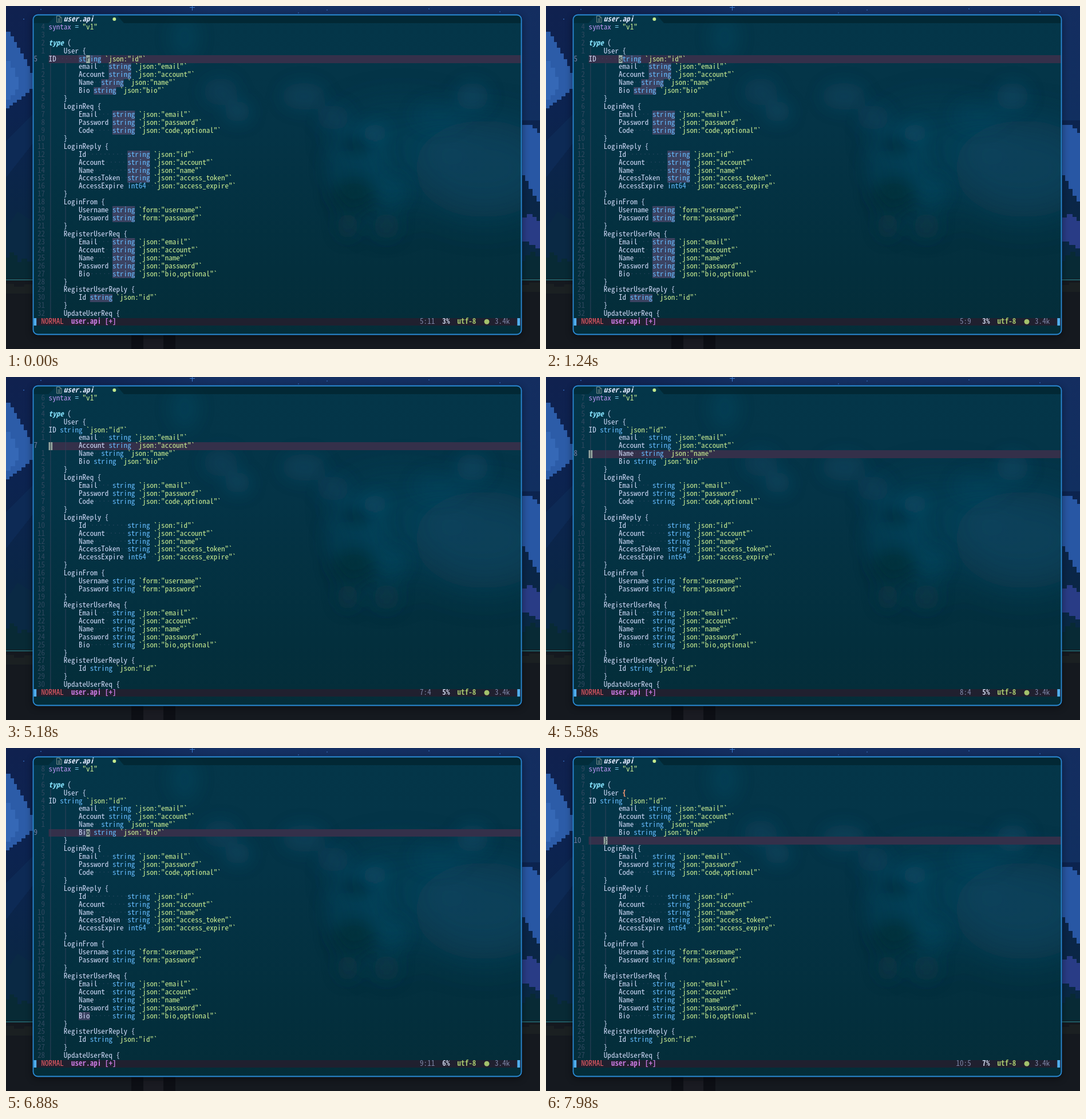
Recreate the animation shown at these times as an HTML page. Size 933 px wide and 600 px high, loop 8000 ms.

```html
<!DOCTYPE html>
<html lang="en">
<head>
<meta charset="utf-8">
<title>Editor session</title>
<style>
  html, body { margin: 0; width: 100%; height: 100%; overflow: hidden; background: #0a1838; }
  svg { display: block; width: 933px; height: 600px; }
  text { white-space: pre; fill: #d0daf8; }
  #editor { font-family: "Noto Sans Mono CJK JP", "Noto Sans Mono CJK SC", "Noto Sans Mono", "DejaVu Sans Mono", monospace; }
  .keyword { fill: #b994f0; }
  .type { fill: #86e1fc; font-weight: 700; font-style: italic; }
  .op { fill: #89ddff; }
  .builtin { fill: #65bcff; }
  .str { fill: #cbee92; }
  .dots { fill: #3b4f6b; opacity: .6; }
  .num { fill: #30485f; }
  .here { fill: #737aa2; }
  .match { fill: #ff966c; font-weight: 700; }
  .under { fill: #1b2b38; }
  .tab { font-weight: 700; font-style: italic; fill: #dfe6fa; }
  .mode { fill: #ec5f67; }
  .file { fill: #c678dd; font-weight: 700; }
  .info { fill: #7e86a8; }
  .percent { fill: #c4cbe0; font-weight: 700; }
  .enc { fill: #a3c26c; font-weight: 700; }
</style>
</head>
<body>
<svg viewBox="0 0 933 600" xmlns="http://www.w3.org/2000/svg">
  <defs>
    <linearGradient id="sky" x2="0" y2="1">
      <stop offset="0" stop-color="#10214f"/>
      <stop offset=".3" stop-color="#0c2350"/>
      <stop offset=".6" stop-color="#0a2646"/>
      <stop offset="1" stop-color="#092d40"/>
    </linearGradient>
    <linearGradient id="glow">
      <stop offset=".1" stop-color="#1d4a86" stop-opacity="0"/>
      <stop offset=".4" stop-color="#1d4a86" stop-opacity=".4"/>
      <stop offset="1" stop-color="#1d4a86" stop-opacity=".3"/>
    </linearGradient>
    <linearGradient id="pane" x2="0" y2="1">
      <stop offset="0" stop-color="#043649"/>
      <stop offset=".35" stop-color="#043447"/>
      <stop offset=".8" stop-color="#032f3d"/>
      <stop offset="1" stop-color="#042d39"/>
    </linearGradient>
    <filter id="soft" x="-60%" y="-60%" width="220%" height="220%"><feGaussianBlur stdDeviation="14"/></filter>
    <filter id="haze" x="-60%" y="-60%" width="220%" height="220%"><feGaussianBlur stdDeviation="32"/></filter>
    <filter id="shade" x="-10%" y="-10%" width="120%" height="120%"><feGaussianBlur stdDeviation="7"/></filter>
    <clipPath id="frame"><rect x="48" y="16" width="852" height="558" rx="7"/></clipPath>
  </defs>

  <g shape-rendering="crispEdges">
    <rect width="933" height="600" fill="url(#sky)"/>
    <rect width="933" height="200" fill="url(#glow)"/>
    <path d="M0 45h8v8h6v10h5v10h6v10h6v10h6v12h5v12h5v28h-6v7h-7v6h-7v6h-8v5h-7v5h-6v5H0z" fill="#2c5ca8"/>
    <path d="M0 96h8v12h8v16h6v22h-6v10h-8v8H0z" fill="#3568b6"/>
    <path d="M0 236L47 190V240L0 300z" fill="#0d2a55"/>
    <path d="M0 390L20 360L47 376V480H0z" fill="#0a2944"/>
    <path d="M0 440h6v-9h8v5h6v12h7v-6h10v5h10v33H0z" fill="#082a35"/>
    <path d="M902 208h18v6h8v8h5v120h-6v-10h-7v-12h-7v-14h-6v-10h-5z" fill="#2857a4"/>
    <path d="M902 370h8v-6h10v5h7v7h6v48h-8v-6h-11v-6h-12z" fill="#293c86"/>
    <path d="M902 446h5v-10h9v-6h9v8h8v42h-31z" fill="#082a35"/>
    <rect y="477" width="933" height="123" fill="#15191f"/>
    <rect y="478" width="933" height="2" fill="#1e5d67"/>
    <path d="M0 486h14v5h18v-4h15v16H0zM902 488h12v-4h19v16h-31z" fill="#1b2022"/>
    <path d="M219 575h21v25h-21zM275 575h21v25h-21z" fill="#0d0f15"/>
    <path d="M240 582h35v18h-35z" fill="#1a1b22"/>
    <path d="M321 2h9v1h-9zM325 0h1v8h-1z" fill="#3f7fd2"/>
    <path d="M60 5h2v2h-2zM510 11h2v2h-2zM560 6h2v2h-2zM738 4h2v2h-2zM862 9h2v2h-2zM30 22h2v2h-2z" fill="#27539a"/>
  </g>

  <rect x="47" y="18" width="854" height="560" rx="8" fill="#000" opacity=".45" filter="url(#shade)"/>
  <rect x="48" y="16" width="852" height="558" rx="7" fill="url(#pane)"/>
  <g clip-path="url(#frame)">
    <g filter="url(#haze)" fill="#1a5a7c">
      <ellipse cx="835" cy="285" rx="120" ry="85" opacity=".36"/>
      <ellipse cx="690" cy="225" rx="110" ry="50" opacity=".22"/>
      <ellipse cx="660" cy="320" rx="50" ry="60" opacity=".2"/>
    </g>
    <g filter="url(#soft)" fill="#1a5a7c">
      <ellipse cx="312" cy="55" rx="24" ry="38" opacity=".22"/>
      <ellipse cx="375" cy="150" rx="30" ry="24" opacity=".25"/>
      <ellipse cx="405" cy="185" rx="22" ry="18" opacity=".38"/>
      <ellipse cx="520" cy="158" rx="38" ry="24" opacity=".28"/>
      <ellipse cx="572" cy="195" rx="28" ry="22" opacity=".25"/>
      <ellipse cx="815" cy="158" rx="28" ry="24" opacity=".35"/>
      <ellipse cx="755" cy="190" rx="45" ry="25" opacity=".16"/>
      <ellipse cx="612" cy="280" rx="55" ry="70" opacity=".2"/>
      <ellipse cx="645" cy="222" rx="22" ry="16" opacity=".38"/>
      <ellipse cx="678" cy="325" rx="22" ry="28" opacity=".22"/>
      <ellipse cx="665" cy="385" rx="22" ry="22" fill="#27424f" opacity=".3"/>
      <ellipse cx="597" cy="385" rx="18" ry="22" fill="#27424f" opacity=".3"/>
      <ellipse cx="612" cy="244" rx="30" ry="13" fill="#052430" opacity=".75"/>
      <ellipse cx="608" cy="330" rx="40" ry="34" fill="#052831" opacity=".6"/>
    </g>
    <path d="M48 16H88L74 30H48z" fill="#02222c" opacity=".45"/>
    <path d="M194 16H900V30H206z" fill="#02222c" opacity=".65"/>
  </g>

  <g id="editor"></g>
  <rect x="47.5" y="15.5" width="853" height="559" rx="8" fill="none" stroke="#2b8bd6" stroke-width="1.8"/>
</svg>

<script type="text/plain" id="code">syntax = "v1"

type (
    User {
ID      string `json:"id"`
        email   string `json:"email"`
        Account string `json:"account"`
        Name  string `json:"name"`
        Bio string `json:"bio"`
    }
    LoginReq {
        Email    string `json:"email"`
        Password string `json:"password"`
        Code     string `json:"code,optional"`
    }
    LoginReply {
        Id           string `json:"id"`
        Account      string `json:"account"`
        Name         string `json:"name"`
        AccessToken  string `json:"access_token"`
        AccessExpire int64  `json:"access_expire"`
    }
    LoginFrom {
        Username string `form:"username"`
        Password string `form:"password"`
    }
    RegisterUserReq {
        Email    string `json:"email"`
        Account  string `json:"account"`
        Name     string `json:"name"`
        Password string `json:"password"`
        Bio      string `json:"bio,optional"`
    }
    RegisterUserReply {
        Id string `json:"id"`
    }
    UpdateUserReq {</script>

<script>
const LOOP = 8000, TOTAL_LINES = 140;
const CELL = 6.55, ROW = 13.93, LEFT = 74.6, TOP = 30.1;
const STATUS_ROW = 37, ID_ROW = 4;

// time, line, cursor column, highlighted word, "ID" line joined
const steps = [
  [0, 5, 10, 'string', false],
  [820, 5, 9, 'string', false],
  [1240, 5, 8, 'string', false],
  [5020, 6, 0, '', true],
  [5180, 7, 0, '', true],
  [5580, 8, 0, '', true],
  [6040, 9, 0, '', true],
  [6600, 9, 10, '', true],
  [6880, 9, 10, 'Bio', true],
  [7120, 9, 17, '', true],
  [7400, 9, 17, 'string', true],
  [7980, 10, 4, '', true]
];

const lines = document.getElementById('code').textContent.split('\n');
const editor = document.getElementById('editor');

// Fit the monospaced font to the terminal grid.
function setFont() {
  const ctx = document.createElement('canvas').getContext('2d');
  ctx.font = '100px ' + getComputedStyle(editor).fontFamily;
  const ratio = ctx.measureText('0').width / 100;
  const size = ratio > 0.55 ? 11.8 : 13;
  editor.style.fontSize = size + 'px';
  editor.style.letterSpacing = CELL - ratio * size + 'px';
}

const colX = col => LEFT + col * CELL;
const rowY = row => TOP + row * ROW;
const text = (row, col, str, cls = '') =>
  `<text x="${colX(col).toFixed(2)}" y="${(rowY(row) + 10.7).toFixed(2)}" class="${cls}">${str}</text>`;

// Cell backgrounds snap to whole pixels vertically.
function rect(row, x, width, fill) {
  const y = Math.round(rowY(row));
  return `<rect x="${x}" y="${y}" width="${width}" height="${Math.round(rowY(row + 1)) - y}" fill="${fill}"/>`;
}
const block = (row, col, width, fill) => rect(row, colX(col), width, fill);
const guide = (row, col, fill) => rect(row, colX(col + .5) - .5, 1, fill);

function tokenClass(token) {
  if (/^[`"]/.test(token)) return 'str';
  return { syntax: 'keyword', type: 'type', '=': 'op', string: 'builtin', int64: 'builtin' }[token] || '';
}

function drawLine(line, row, word) {
  let out = '';
  if (row > 2 && line[0] === ' ') out += guide(row, 0, '#34425c');
  if (line.startsWith('        ')) out += guide(row, 4, '#34425c');
  for (const { 0: token, index } of line.matchAll(/`[^`]*`|"[^"]*"|\S+/g)) {
    if (token === word) out += block(row, index, token.length * CELL, '#3b4261');
    out += text(row, index, token, tokenClass(token));
  }
  for (const { 0: gap, index } of line.matchAll(/(?<=\S) {2,}/g))
    out += text(row, index, '·'.repeat(gap.length), 'dots');
  return out;
}

function drawNumbers(current) {
  return lines.map((_, row) => row === current
    ? text(row, -4, row + 1, 'here')
    : text(row, -4, String(Math.abs(row - current)).padStart(3), 'num')).join('');
}

function drawTab() {
  return `<path d="M88.5 17.5h5.5l3 3v8h-8.5zM94 17.5v3h3M90.5 22.5h4.5M90.5 24.5h4.5M90.5 26.5h4.5" fill="none" stroke="#85958f" stroke-width=".9"/>`
    + text(-1, 4, 'user.api', 'tab')
    + '<circle cx="189.3" cy="23" r="3" fill="#c3e88d"/>';
}

function drawStatus(line, col) {
  const row = STATUS_ROW;
  return block(row, -4, 130 * CELL, '#20202f')
    + block(row, -4, 4.8, '#51afef')
    + block(row, 125, 4.8, '#51afef')
    + text(row, -2, 'NORMAL', 'mode')
    + text(row, 6, 'user.api [+]', 'file')
    + text(row, 98, String(line).padStart(2) + ':' + (col ? col + 1 : 4), 'info')
    + text(row, 105, Math.floor(100 * line / TOTAL_LINES) + '%', 'percent')
    + text(row, 109, 'utf-8', 'enc')
    + '<circle cx="840" cy="552.3" r="4.5" fill="#a3c26c"/>'
    + text(row, 119, '3.4k', 'info');
}

function drawCursor(row, col, line) {
  const under = col ? text(row, col, line[col], 'under') : guide(row, 0, '#22333f');
  return block(row, col, CELL, '#98a9a2') + under;
}

function render([, lineNo, col, word, joined]) {
  const row = lineNo - 1;
  const shown = lines.map((line, i) => joined && i === ID_ROW ? line.replace(/ +/, ' ') : line);
  const brace = shown[row][col] === '}' ? text(3, 9, '{', 'match') : '';
  editor.innerHTML = drawTab()
    + block(row, 0, 126 * CELL, '#34304a')
    + drawNumbers(row)
    + shown.map((line, i) => drawLine(line, i, word)).join('')
    + brace
    + drawCursor(row, col, shown[row])
    + drawStatus(lineNo, col);
}

let start, active;
function tick(now) {
  start ??= now;
  const time = (now - start) % LOOP;
  const step = steps.findLast(s => s[0] <= time) || steps[0];
  if (step !== active) render(active = step);
  requestAnimationFrame(tick);
}

setFont();
render(active = steps[0]);
requestAnimationFrame(tick);
</script>
</body>
</html>
```
